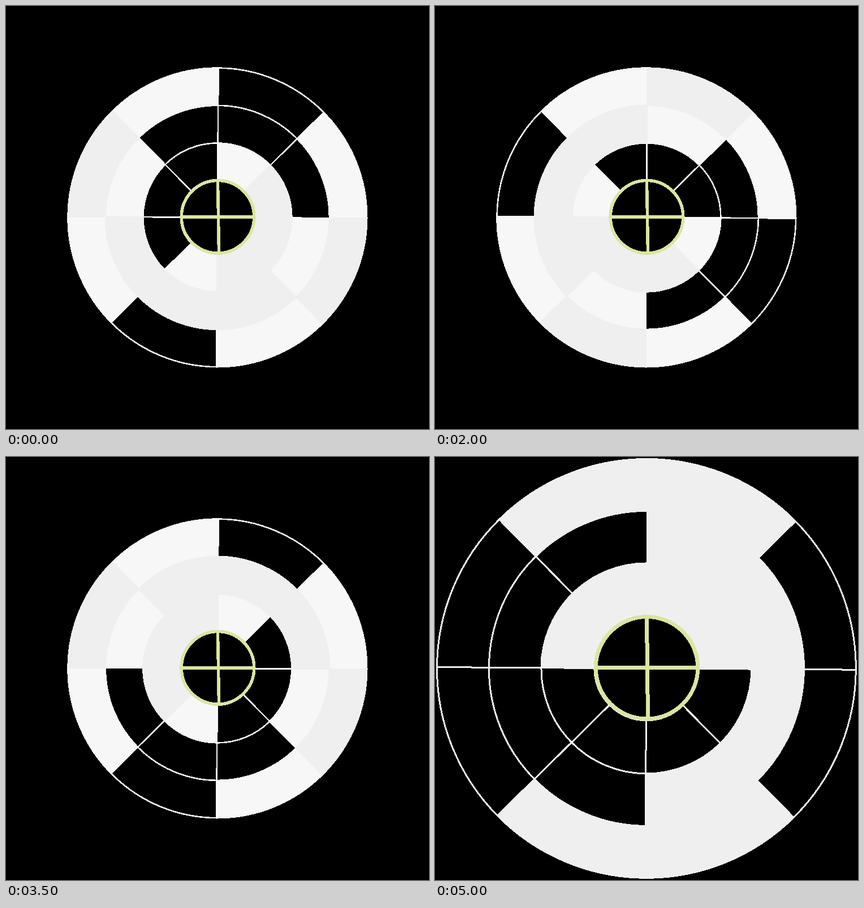
An HTML page for the animation above (5.5 s loop, 748 by 748 pixels).

```html
<!DOCTYPE html>
<html lang="en">
<head>
<meta charset="utf-8">
<title>Gray code wheel</title>
<style>
  html, body { margin: 0; width: 100%; height: 100%; overflow: hidden; background: #000; }
  svg { display: block; width: 100%; height: 100%; shape-rendering: crispEdges; }
</style>
</head>
<body>
<svg id="stage" viewBox="0 0 748 748"></svg>
<script>
const STEP = 500;
// Wheel position in eighths of a turn; halves blend two neighbouring positions.
const POSITIONS = [4.5, 5, 5.5, 6, 6.5, 7, 8, 8.5, 9, 9.5, 10];
const CENTER = 373.9;
const TILT = 0.35;
const GRAY = '#efefef', LIGHT = '#f7f7f7', GREEN = '#dbe5a0';

// Tracks from the hub outwards: first filled sector, repeat period.
const TRACKS = [
  { start: 4, period: 8 },
  { start: 6, period: 8 },
  { start: 1, period: 4 },
];
const LARGE = { radii: [92, 186, 278.5, 370.4], line: 3, hub: 90.3, stroke: 7 };
const SMALL = { radii: [65, 131.5, 198, 264.3], line: 2.6, hub: 64.3, stroke: 5.5 };

const stage = document.getElementById('stage');
const mod = (a, n) => ((a % n) + n) % n;

function point(radius, sector) {
  const angle = (sector * 45 + TILT) * Math.PI / 180;
  return `${(CENTER + radius * Math.sin(angle)).toFixed(2)} ${(CENTER - radius * Math.cos(angle)).toFixed(2)}`;
}

function cellPath(inner, outer, s) {
  return `M${point(inner, s)}L${point(outer, s)}` +
    `A${outer} ${outer} 0 0 1 ${point(outer, s + 1)}L${point(inner, s + 1)}` +
    `A${inner} ${inner} 0 0 0 ${point(inner, s)}Z`;
}

function isFilled({ start, period }, sector, turn) {
  return mod(sector - start - turn, period) < period / 2;
}

function draw(position) {
  const size = position % 2 === 0 ? LARGE : SMALL;
  const layers = ['', '', ''];
  TRACKS.forEach((track, ring) => {
    for (let s = 0; s < 8; s++) {
      const tone = isFilled(track, s, Math.floor(position)) + isFilled(track, s, Math.ceil(position));
      layers[tone] += cellPath(size.radii[ring], size.radii[ring + 1], s);
    }
  });

  const lineColor = position % 1 ? LIGHT : GRAY;
  const path = (d, fill, stroke, width) =>
    `<path d="${d}" fill="${fill}" stroke="${stroke}" stroke-width="${width}"/>`;
  const h = size.hub, cx = 374.5, cy = 372.8;
  stage.innerHTML =
    path(layers[0], 'none', lineColor, size.line) +
    path(layers[1], LIGHT, LIGHT, size.line) +
    path(layers[2], GRAY, GRAY, size.line) +
    `<circle cx="${cx}" cy="${cy}" r="${h}" fill="#000" stroke="${GREEN}" stroke-width="${size.stroke}"/>` +
    path(`M${cx} ${cy - h}L${cx + 2} ${cy + h}M${cx - h} ${cy}H${cx + h}`, 'none', GREEN, size.stroke);
}

let shown = -1;
const origin = performance.now();
function tick(now) {
  const step = Math.floor(Math.max(0, now - origin) / STEP) % POSITIONS.length;
  if (step !== shown) draw(POSITIONS[shown = step]);
  requestAnimationFrame(tick);
}
tick(origin);
</script>
</body>
</html>
```
